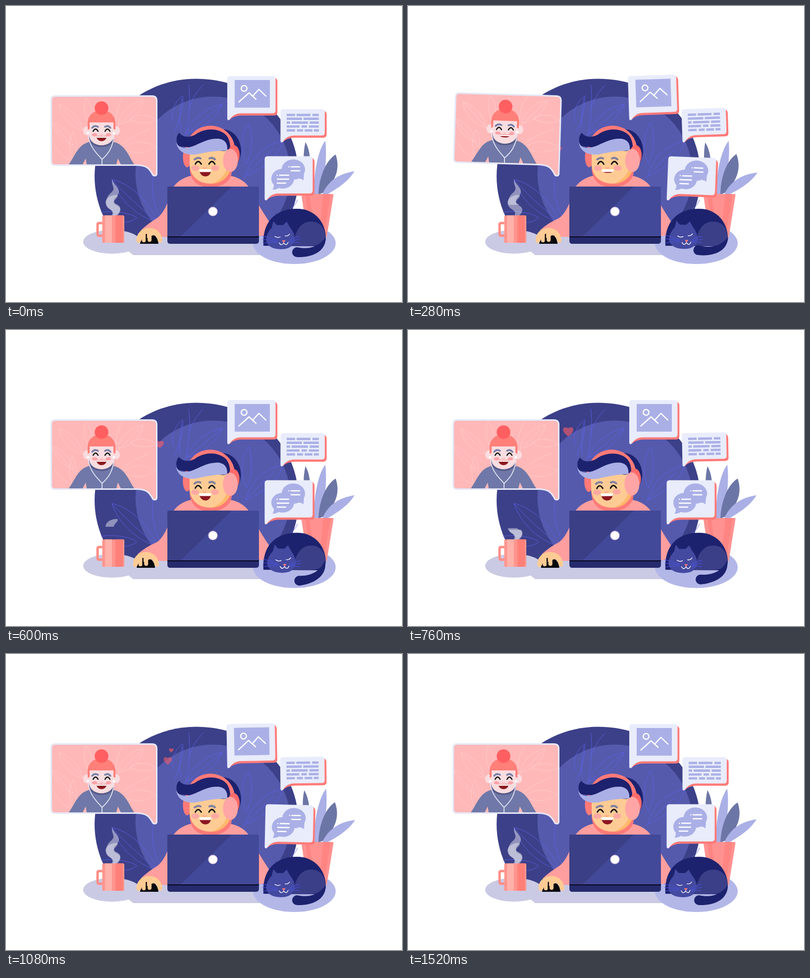
Recreate the animation shown at these times as an HTML page. Size 800 px wide and 600 px high, loop 1560 ms.

```html
<!DOCTYPE html>
<html lang="en">
<head>
<meta charset="utf-8">
<title>Video call</title>
<style>
  html, body { margin: 0; width: 100%; height: 100%; overflow: hidden; background: #fff; }
  svg { display: block; width: 100vw; height: 100vh; }
  .line { fill: none; stroke-linecap: round; stroke-linejoin: round; }
  .navy { fill: #1d226e; }
  .pale { fill: #aab0e6; }
  .coral { fill: #ff7a78; }
  .skin { fill: #ffcb94; }
</style>
</head>
<body>
<svg viewBox="0 0 800 600">
  <defs>
    <clipPath id="room"><path d="M170 140H600V467H170Z"/></clipPath>
    <path id="blob" d="M384 147.5C503 147.5 591 232 591 345C591 455 498 545 385 545C271 545 179 455 179 345C179 236 270 147.5 384 147.5Z"/>
    <clipPath id="disc"><use href="#blob"/></clipPath>
    <clipPath id="screen"><path d="M93 184H303V321H93Z"/></clipPath>
    <clipPath id="clipLow"><rect id="lowRect" x="190" width="60"/></clipPath>
    <clipPath id="clipTall"><rect id="tallRect" x="190" width="60"/></clipPath>
    <path id="heart" d="M0 10C-16-1-10-12 0-6C10-12 16-1 0 10Z"/>
  </defs>

  <!-- backdrop -->
  <g clip-path="url(#room)">
    <use href="#blob" fill="#3c4088"/>
    <circle cx="418" cy="340" r="156.5" fill="#555aac" clip-path="url(#disc)"/>
  </g>
  <g class="line" stroke="#5c62ee" stroke-width="1" opacity=".85">
    <path d="M339 235C329 215 344 191 357 182C359 205 352 227 341 255M355 188Q349 230 352 252M369 160Q375 198 363 262M398 160Q371 190 369 213"/>
    <path d="M437 199C405 205 373 230 366 258C395 250 425 227 437 199M437 199Q400 230 357 266"/>
    <path d="M490 237C477 252 471 295 486 320C500 292 498 258 490 237"/>
    <path d="M559 273C520 282 493 310 484 345M559 273C555 300 520 330 484 345M540 290Q505 320 480 350"/>
    <path d="M214 352C248 357 292 398 306 438C266 428 228 393 214 352M214 352Q250 392 306 438M298 340C292 370 298 405 312 428"/>
    <path d="M192 418C220 414 252 420 264 429C252 440 235 440 225 436M589 393Q585 404 575 411"/>
  </g>

  <!-- surfaces -->
  <ellipse cx="214" cy="478" rx="58" ry="24" fill="#cacae4"/>
  <path d="M230 467H540V505H257L247 497Z" fill="#cacae4"/>
  <ellipse cx="582.5" cy="481" rx="83.5" ry="42" fill="#b3b7e8"/>

  <!-- plant -->
  <path id="leafSmall" fill="#6c76a6" d="M602 320C600 302 603 284 605 276C611 287 615 300 615 330Z"/>
  <path id="leafPale" class="pale" d="M623 382C620 342 631 290 645 273C649 304 645 350 632 382Z"/>
  <path id="leafDark" fill="#6c76a6" d="M631 382C633 342 648 312 666 301C675 328 668 352 642 378Z"/>
  <path id="leafRight" class="pale" d="M639 382C652 351 677 339 704 335C690 358 667 371 649 382Z"/>
  <path fill="#ff9290" d="M599 381H659Q662 381 661.5 384L648 468H609L597 384Q597 381 599 381Z"/>
  <path fill="#ff8583" d="M605 381H613L624 468H616ZM641 381H656L642 468H632Z"/>

  <g id="hearts" fill="#ff5d66"></g>

  <!-- caller -->
  <g id="video">
    <path fill="#ffb8b8" stroke="#e4e8f8" stroke-width="3" d="M99 182.5H295Q304.5 182.5 304.5 192V341Q303 346 297 343C290 330 285 323 265 322.5H99Q91.500 322.5 91.5 315V190Q91.5 182.5 99 182.5Z"/>
    <g clip-path="url(#screen)">
      <g class="line" stroke="#ffcaca" stroke-width="1">
        <path d="M107 200C110 225 130 245 155 252C150 225 130 207 107 200L160 255M162 185C154 205 160 225 168 240C178 220 172 200 162 185M92 235C115 240 132 262 136 282C115 275 99 258 92 235L140 290"/>
        <path d="M277 192C250 197 231 216 226 240C255 235 273 215 277 192L220 250M303 232C285 240 260 238 250 228C270 218 290 220 303 232M236 186Q222 205 222 232"/>
        <path d="M135 255C124 275 128 300 136 318C146 295 144 275 135 255M98 282C108 300 120 308 136 316M302 285C275 270 250 275 232 290C260 300 285 300 302 285M290 250Q250 265 228 285"/>
      </g>
      <path fill="#6f78a8" d="M127 321C140 303 146 279 171 275H215C240 279 247 303 259 321H232L226 309L223 321H163L161 309L155 321Z"/>
      <path fill="#575b88" d="M168 262H218V273C210 290 176 290 168 273Z"/>
      <g id="caller">
        <g fill="#f9dde0">
          <ellipse cx="163" cy="253" rx="7" ry="9"/><ellipse cx="223" cy="253" rx="7" ry="9"/>
          <path d="M168 230H218V262C216 289 170 289 168 262Z"/>
        </g>
        <path fill="#ff7f79" d="M165 251V236C167 203 219 203 221 236V251L217 249V236H169V249Z"/>
        <circle cx="193" cy="207" r="13.8" fill="#ff5f60"/>
        <path class="line" stroke="#7780a8" stroke-width="3.5" d="M174 247Q179 241 186 245M200 245Q206 241 211 247"/>
        <path class="line" stroke="#151515" stroke-width="2.5" d="M176 254Q181 245 186 254M200 254Q205 245 210 254"/>
        <path class="line" stroke="#f3a8ac" d="M190 260q3 2 6 0"/>
        <ellipse cx="179" cy="261" rx="5.5" ry="3.2" fill="#ffa3a8"/>
        <ellipse cx="207" cy="261" rx="5.5" ry="3.2" fill="#ffa3a8"/>
        <path fill="#ff8f8f" d="M183 263H204V265H183Z"/>
        <path id="callerMouth" fill="#8c1820" d="M183 266H203C201 276.5 185 276.500 183 266Z"/>
        <path fill="#fff" d="M183 264.5H203.500L202.5 267H183.5Z"/>
      </g>
      <path class="line" stroke="#e3e6f5" stroke-width="1.8" d="M166 259C168 287 185 300 194 311C206 300 217 287 218 259M194 311V321"/>
      <circle cx="166" cy="258" r="2.5" fill="#fff"/><circle cx="218" cy="258" r="2.5" fill="#fff"/>
    </g>
  </g>

  <!-- man -->
  <path fill="#ff9e9e" d="M326 402C328 372 348 343 388 343H446C470 346 486 356 496 376L511 404Q519 418 531 436L526 466H326Z"/>
  <path id="arm" fill="#ff9e9e"/>
  <g id="head">
    <path class="navy" d="M405 262C445 232 476 262 475 296Q473 314 462 326L450 345Z"/>
    <ellipse cx="366" cy="306" rx="8.5" ry="21" class="coral"/>
    <path class="coral" d="M371 322C370 352 384 367 413 368C442 367 457 350 456 334Z"/>
    <path class="skin" d="M371 285V320C371 344 388 360 413 360C438 360 455 341 455 322V280Z"/>
    <path fill="#ffb96d" d="M455 310V322C455 342 438 360 416 360C437 352 446 337 449 320Z"/>
    <path class="line" stroke="#ff7a78" stroke-width="9" d="M375 268A45 45 0 0 1 458 289"/>
    <g id="face">
      <path class="navy" d="M350 257C358 267 370 267 382 261C400 247 431 246 446 263Q454 274 453 292L440 294L348 284C343 275 343 264 350 257Z"/>
      <path class="pale" d="M344 277C347 295 362 303 384 301C406 296 424 293 447 293C449 275 438 268 424 269C396 270 378 291 356 287Q348 285 344 277Z"/>
      <path class="line" stroke="#80809f" stroke-width="4" d="M381 311Q387 306 393 309M411 309Q417 306 422 311"/>
      <path class="line" stroke="#111" stroke-width="2.8" d="M382.5 320.5Q388 310 394.5 320.5M410 320.5Q416 310 422 320.5"/>
      <path class="line" stroke="#ff9a83" stroke-width="1.5" d="M398 327q3.500 4 7 0"/>
      <ellipse cx="382.5" cy="328.5" rx="8" ry="5.5" fill="#ffa9a3"/>
      <ellipse cx="422.5" cy="328.5" rx="8" ry="5.5" fill="#ffa9a3"/>
      <path id="mouth" fill="#8c1820" d="M391 335H414C412 349 394 349 391 335Z"/>
      <path fill="#fff" d="M391 331H414Q416 334 413 336.5H392Q389 334 391 331Z"/>
    </g>
    <ellipse cx="460" cy="302" rx="12" ry="20" fill="#ff6b6a"/>
    <ellipse cx="453.5" cy="313" rx="15" ry="23.5" fill="#ffa5a5"/>
  </g>

  <!-- laptop -->
  <path d="M326 462H511V474H326Z" fill="#07071c"/>
  <rect x="326" y="366" width="185" height="101" rx="3" fill="#434999"/>
  <path fill="#3b3f86" d="M326 369Q326 366 329 366H456L356 464Q353 467 348 467H326Z"/>
  <path fill="#262b6d" d="M326 469H511V476Q511 482 505 482H332Q326 482 326 476Z"/>
  <circle cx="418" cy="416.5" r="8.8" fill="#fff" stroke="#dccbea" stroke-width="1.5"/>

  <g id="hand">
    <path fill="#08080d" d="M271 482C271 469 280 463 297 464Q307 468 308 482Z"/>
    <path class="skin" d="M264 478C262 460 275 450 291 450C308 451 317 465 315.5 478Q310 482 307 477C305 466 299 462 293 467L286 470H276L272 478Q268 483 264 478Z"/>
    <path class="line" stroke="#ffcb94" stroke-width="8" d="M278.5 464V475M290 464V474"/>
    <path class="line" stroke="#08080d" stroke-width="2.5" d="M283.5 463V479"/>
  </g>

  <!-- mug -->
  <g fill="#fff" opacity=".9">
    <path clip-path="url(#clipTall)" opacity=".48" d="M214 352C213 365 222 369 213 378C200 388 200 403 207 410C216 415 217 420 213 425H223C226 420 231 418 231 411C230 400 217 404 218 394C220 386 228 386 228 375C227 366 219 363 214 352Z"/>
    <path clip-path="url(#clipLow)" opacity=".48" d="M215 425C222 412 203 415 201 399C202 387 214 383 225 383C228 388 221 390 218 397C217 404 231 404 231 413Q230 421 224 425Z"/>
  </g>
  <path class="line" stroke="#ff8e88" stroke-width="5" d="M196 440H188Q185 440 185 443V462Q185 465.5 188 465.5H196"/>
  <rect x="194.5" y="424.5" width="44.5" height="55.5" rx="2" fill="#ff958e"/>
  <path fill="#ffb1aa" d="M200 424.5H214V480H200Z"/>
  <path fill="#ff8079" d="M221 424.5H236V480H221Z"/>

  <!-- cat -->
  <path class="navy" d="M520 486C517 440 542 411 588 411C625 411 646 440 646 470Q645 486 630 487Z"/>
  <path fill="#3b3f88" d="M580 486C584 455 595 437 617 437C638 437 646 455 645 471C640 487 622 488 580 486Z"/>
  <path id="tail" class="navy" d="M646 468C647 500 615 510 588 509A10 10 0 0 1 588 489C606 493 630 492 646 468Z"/>
  <g id="catHead">
    <path fill="#444aa0" d="M540 436L547 444H560L567 437L574 449C591 470 585 493 556 493C524 493 517 472 537 449Z"/>
    <path class="line" stroke="#fff" stroke-width="1.4" d="M543 467q6 4 11 1M564 466q6 1 9-4M552 480q4 8 9 0q5 8 9-1"/>
    <path fill="#ff7b80" d="M557.5 475H565L561 480Z"/>
    <path class="line" stroke="#4a52e6" d="M518 466Q535 470 547 475M518 473Q532 474 547 477M520 481Q532 478 547 479M593 467Q580 470 572 475M594 473Q582 474 572 477M592 480Q582 478 572 479"/>
  </g>

  <!-- message cards -->
  <g id="photo">
    <path class="pale" d="M462 150H533V206H462Z"/>
    <g class="line" stroke="#fff" stroke-width="2.4">
      <circle cx="481" cy="167" r="5.8"/>
      <path d="M470.5 194.5L491 176L505 189M499 182L511 169L525 182.5"/>
    </g>
  </g>
  <g id="text"></g>
  <g id="chat">
    <g class="pale">
      <ellipse cx="580.5" cy="331.5" rx="23.7" ry="20.5"/><path d="M592 350Q599 350 601 354L602 338Z"/>
      <ellipse cx="559" cy="350" rx="23" ry="20"/><path d="M541 358Q542 367 538.5 372Q545 373 553 368Z"/>
    </g>
    <path class="line" stroke="#fff" stroke-width="2.5" d="M571.5 326h.01M576 326H593M576 334H593.5M548 343h.01M553 343H571M548 351H571M548 359H565"/>
  </g>
</svg>

<script>
const $ = id => document.getElementById(id);
const LOOP = 1560, STEP = 40;

function addCard(id, x, y, w, h) {
  const r = x + w, b = y + h;
  const shadow = `M${x + 4} ${b + 14}Q${x + 12} ${b + 4.5} ${x + 30} ${b + 4.5}H${r - 3}Q${r + 3.8} ${b + 4.5} ${r + 3.8} ${b - 2}V${y + 10}Q${r + 3} ${y + 5} ${r - 3} ${y + 2}L${x + 8} ${b - 8}Z`;
  const front = `M${x + 6} ${y}H${r - 6}Q${r} ${y} ${r} ${y + 6}V${b - 6}Q${r} ${b} ${r - 6} ${b}H${x + 28}Q${x + 13} ${b} ${x + 5} ${b + 12.5}Q${x} ${b + 17} ${x} ${b + 9}V${y + 6}Q${x} ${y} ${x + 6} ${y}Z`;
  $(id).insertAdjacentHTML('afterbegin', `<path class="coral" d="${shadow}"/><path fill="#e9ecfb" d="${front}"/>`);
}
addCard('photo', 447, 142, 97.5, 75.5);
addCard('text', 554.5, 209, 89.5, 53.5);
addCard('chat', 522.5, 304.5, 97, 75.5);

const rows = [
  [567, 584, 587, 615, 619, 632],
  [567, 598, 601, 632],
  [567, 574, 577, 610, 613.5, 632],
  [567, 593, 597, 608, 612, 632],
  [567, 584, 588, 600, 603.5, 619, 622, 632]
];
let bars = '';
rows.forEach((row, i) => {
  for (let k = 0; k < row.length; k += 2) bars += `M${row[k]} ${218.5 + i * 7.8}H${row[k + 1]}v4.7H${row[k]}Z`;
});
$('text').insertAdjacentHTML('beforeend', `<path class="pale" d="${bars}"/>`);

const hearts = [
  { from: 40, to: 560, x: 309, y: 297, vx: -8, vy: -34, size: .45, hold: .5 },
  { from: 520, to: 1040, x: 304, y: 244, vx: 82, vy: -162, size: .72, grow: 1.25, hold: .6 },
  { from: 840, to: 1400, x: 300, y: 237, vx: 112, vy: -88, size: .85, hold: .55 },
  { from: 760, to: 1320, x: 322, y: 235, vx: 37, vy: -125, size: .48, hold: .6 }
];
$('hearts').innerHTML = hearts.map(() => '<use href="#heart"/>').join('');

const clamp = v => Math.max(0, Math.min(1, v));
const part = (t, a, b) => clamp((t - a) / (b - a));
// Eased swing out and back between two times.
const swing = (t, a, b) => Math.sin(Math.PI * part(t, a, b)) ** 2;
// Eased interpolation through [time, value] pairs.
function keys(t, pairs) {
  let value = pairs[0][1];
  for (let i = 1; i < pairs.length; i++) {
    const p = part(t, pairs[i - 1][0], pairs[i][0]);
    value += (pairs[i][1] - pairs[i - 1][1]) * p * p * (3 - 2 * p);
  }
  return value;
}
const set = (id, transform) => $(id).setAttribute('transform', transform);
const turn = (id, angle, x, y) => set(id, `rotate(${angle} ${x} ${y})`);
const squash = (id, k, y) => set(id, `translate(0 ${y * (1 - k)}) scale(1 ${k})`);
function reveal(id, top, bottom) {
  $(id).setAttribute('y', top);
  $(id).setAttribute('height', Math.max(0, bottom - top));
}

function draw(t) {
  const first = swing(t, 0, 600);
  const both = first + swing(t, 920, 1520);

  turn('photo', -1.9 * both, 449, 231);
  turn('text', -1.9 * (first + swing(t, 600, 1200)), 557, 274);
  turn('chat', 2.3 * both, 525, 393);
  turn('video', 1.75 * first, 299, 345);
  turn('caller', swing(t, 1120, 1520), 193, 282);

  turn('leafSmall', -2.5 * both, 612, 380);
  turn('leafPale', 1.5 * both, 628, 381);
  turn('leafDark', -1.8 * both, 636, 381);
  turn('leafRight', 2.6 * both, 642, 381);

  turn('head', -1.6 * swing(t, 520, 1120), 415, 360);
  set('face', `translate(${1.7 * swing(t, 0, 400)} 0)`);
  squash('mouth', 1 - .63 * first, 334);
  squash('callerMouth', 1 - .55 * first, 266);

  const x = -8.7 * swing(t, 0, 920);
  set('hand', `translate(${x} 0)`);
  $('arm').setAttribute('d', `M330 390Q319 420 305 430Q${288 + x} 440 ${272 + x} 455L${312 + x} 468H330Z`);

  turn('tail', keys(t, [[0, 0], [180, 4.5], [420, 4], [620, -10.5], [1000, 0]]), 642, 478);
  const nod = swing(t, 0, 920);
  set('catHead', `translate(${2 * nod} ${-nod}) rotate(${1.5 * nod} 556 490)`);

  const low = t < 660 ? [383, 425 - 42 * part(t, 500, 660)] : [425 - 42 * part(t, 660, 840), 425];
  const tall = t < 660 ? [352, 425 - 73 * part(t, 220, 420)] : [425 - 73 * part(t, 700, 920), 425];
  reveal('lowRect', ...low);
  reveal('tallRect', ...tall);

  hearts.forEach((h, i) => {
    const node = $('hearts').children[i], s = (t - h.from) / 1000, p = part(t, h.from, h.to);
    const size = h.size + (h.grow ? (h.grow - h.size) * clamp(p * 1.3) : 0);
    node.setAttribute('transform', `translate(${h.x + h.vx * s} ${h.y + h.vy * s}) scale(${size})`);
    node.setAttribute('opacity', p > 0 && p < 1 ? h.hold * clamp((1 - p) * 2.2) : 0);
  });
}

function tick() {
  draw(Math.floor(performance.now() % LOOP / STEP) * STEP);
  requestAnimationFrame(tick);
}
tick();
</script>
</body>
</html>
```
